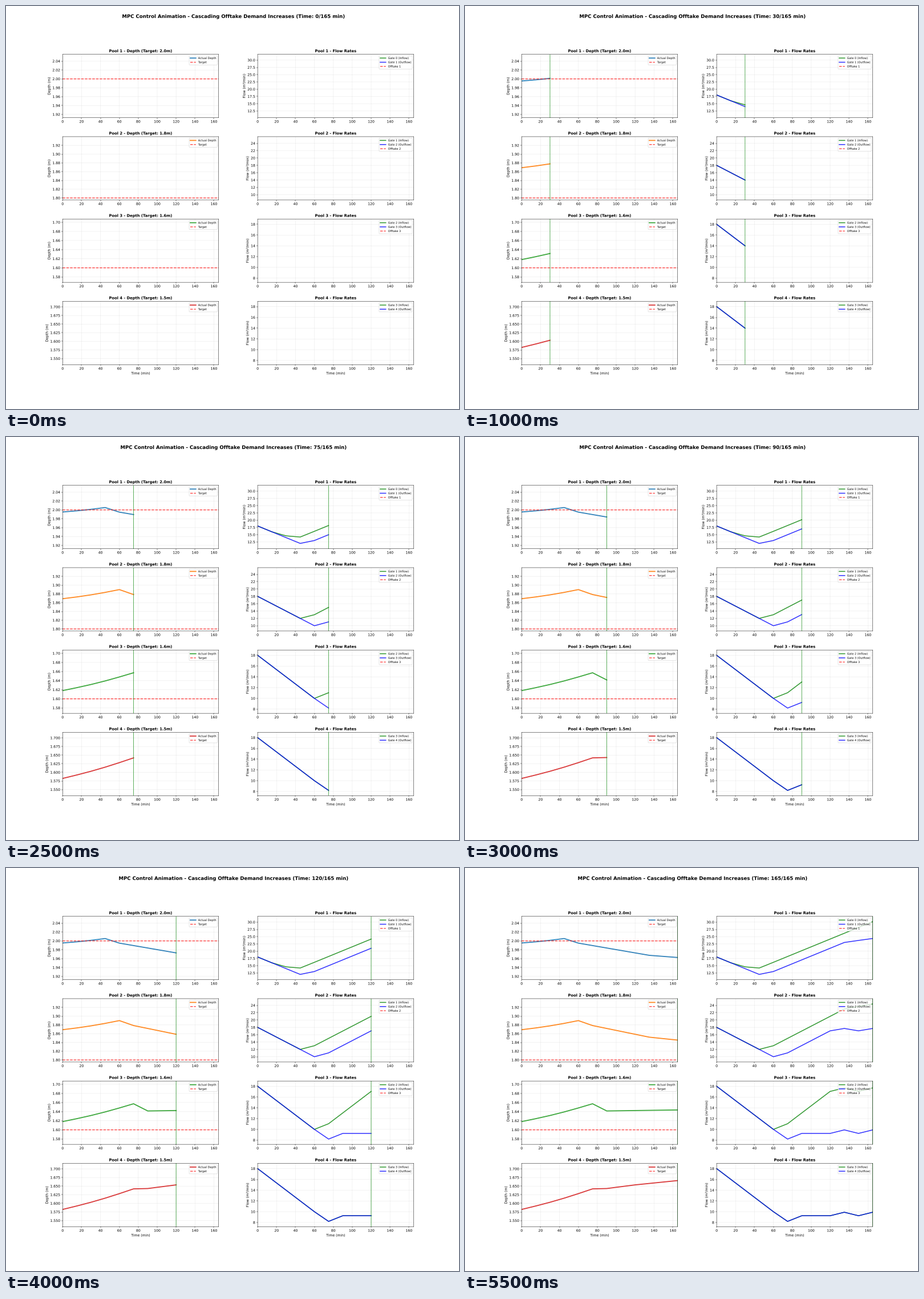
Animation, 794 px wide and 706 px high, one loop 6000 ms. Source, as a matplotlib script:

```python
import numpy as np
import matplotlib.pyplot as plt
from matplotlib.animation import FuncAnimation
from matplotlib.patheffects import Normal

# Outline text and unsnapped lines keep fractional pixel positions.
plt.rcParams.update({
    "font.family": "DejaVu Sans",
    "text.hinting": "none",
    "path.snap": False,
    "path.effects": [Normal()],
})

WIDTH, HEIGHT = 794, 706
DPI = WIDTH / 18
STEP, END = 15, 165
MIN_FLOW = 8.2
times = np.arange(0, END + 1, STEP)
steps = times / STEP

targets = [2.0, 1.8, 1.6, 1.5]
colors = ["tab:blue", "tab:orange", "tab:green", "tab:red"]

# Turning points (minute, depth) of each pool; the second one ends the filling.
turns = [
    [(0, 1.9953), (45, 2.0053), (60, 1.995), (135, 1.9675), (165, 1.9626)],
    [(0, 1.869), (60, 1.8898), (75, 1.8785), (135, 1.852), (165, 1.8453)],
    [(0, 1.6181), (75, 1.6573), (90, 1.6415), (165, 1.6437)],
    [(0, 1.5823), (75, 1.642), (90, 1.643), (120, 1.6536), (165, 1.6661)],
]


def pool_depth(points, sag):
    """Straight runs between turning points, with a slight sag while filling."""
    minutes, levels = zip(*points)
    filling = np.minimum(times / minutes[1], 1)
    return np.interp(times, minutes, levels) - sag * np.sin(np.pi * filling)


def gate_flow(start, cap=np.inf):
    """Closes by 2 m³/min per step, then opens at the same rate up to a cap."""
    opening = np.minimum(start + 2 * steps, cap)
    return np.maximum.reduce([18 - 2 * steps, opening,
                              np.full_like(steps, MIN_FLOW)])


depths = [pool_depth(points, 0.0008 * i) for i, points in enumerate(turns, 1)]
hunting = 0.65 * (steps > 8) * (steps % 2)
last_gate = gate_flow(-2.75, 9.25 + hunting)
gates = [
    np.maximum(gate_flow(8.17), 15.4 - 0.4 * steps),
    gate_flow(5, 17 + 0.67 * steps),
    gate_flow(1.05, 17.05 + hunting),
    last_gate,
    last_gate,
]

fig, axes = plt.subplots(4, 2, figsize=(WIDTH / DPI, HEIGHT / DPI), dpi=DPI)
fig.subplots_adjust(left=0.125, right=0.9, bottom=0.11, top=0.88,
                    hspace=0.3, wspace=0.25)
heading = fig.suptitle("", fontsize=14, fontweight="bold", y=0.98)

traces = []
markers = []


def add_trace(ax, values, **style):
    line, = ax.plot([], [], **style)
    traces.append((line, values))


def finish(ax, title, ylabel, values, pad):
    ax.set_title(title, fontsize=11, fontweight="bold")
    ax.set_ylabel(ylabel)
    ax.set_xlim(0, END)
    ax.set_ylim(np.min(values) - pad, np.max(values) + pad)
    ax.grid(True, alpha=0.3)
    ax.legend(loc="upper right", fontsize=8)
    markers.append(ax.axvline(0, color="green", alpha=0.7, lw=1.5))


for i, (depth_ax, flow_ax) in enumerate(axes):
    pool = i + 1
    add_trace(depth_ax, depths[i], color=colors[i], lw=3, alpha=0.9,
              label="Actual Depth")
    depth_ax.axhline(targets[i], color="r", ls="--", lw=2, alpha=0.8,
                     label="Target")
    finish(depth_ax, f"Pool {pool} - Depth (Target: {targets[i]}m)",
           "Depth (m)", depths[i], 0.05)

    add_trace(flow_ax, gates[i], color="g", lw=2.5, alpha=0.8,
              label=f"Gate {i} (Inflow)")
    add_trace(flow_ax, gates[pool], color="b", lw=2.5, alpha=0.8,
              label=f"Gate {pool} (Outflow)")
    if pool < 4:
        flow_ax.plot([], [], "r--", lw=2, alpha=0.8, label=f"Offtake {pool}")
    flows = gates[i:i + 2]
    finish(flow_ax, f"Pool {pool} - Flow Rates", "Flow (m³/min)",
           flows, 0.1 * np.ptp(flows))

for ax in axes[-1]:
    ax.set_xlabel("Time (min)")


def update(frame):
    now = times[frame]
    heading.set_text("MPC Control Animation - Cascading Offtake Demand "
                     f"Increases (Time: {now}/{END} min)")
    for line, values in traces:
        line.set_data(times[:frame + 1], values[:frame + 1])
    for marker in markers:
        marker.set_xdata([now, now])
        marker.set_visible(frame > 0)


anim = FuncAnimation(fig, update, frames=len(times), interval=500,
                     init_func=lambda: update(0), repeat=True, repeat_delay=0)
plt.show()
```
